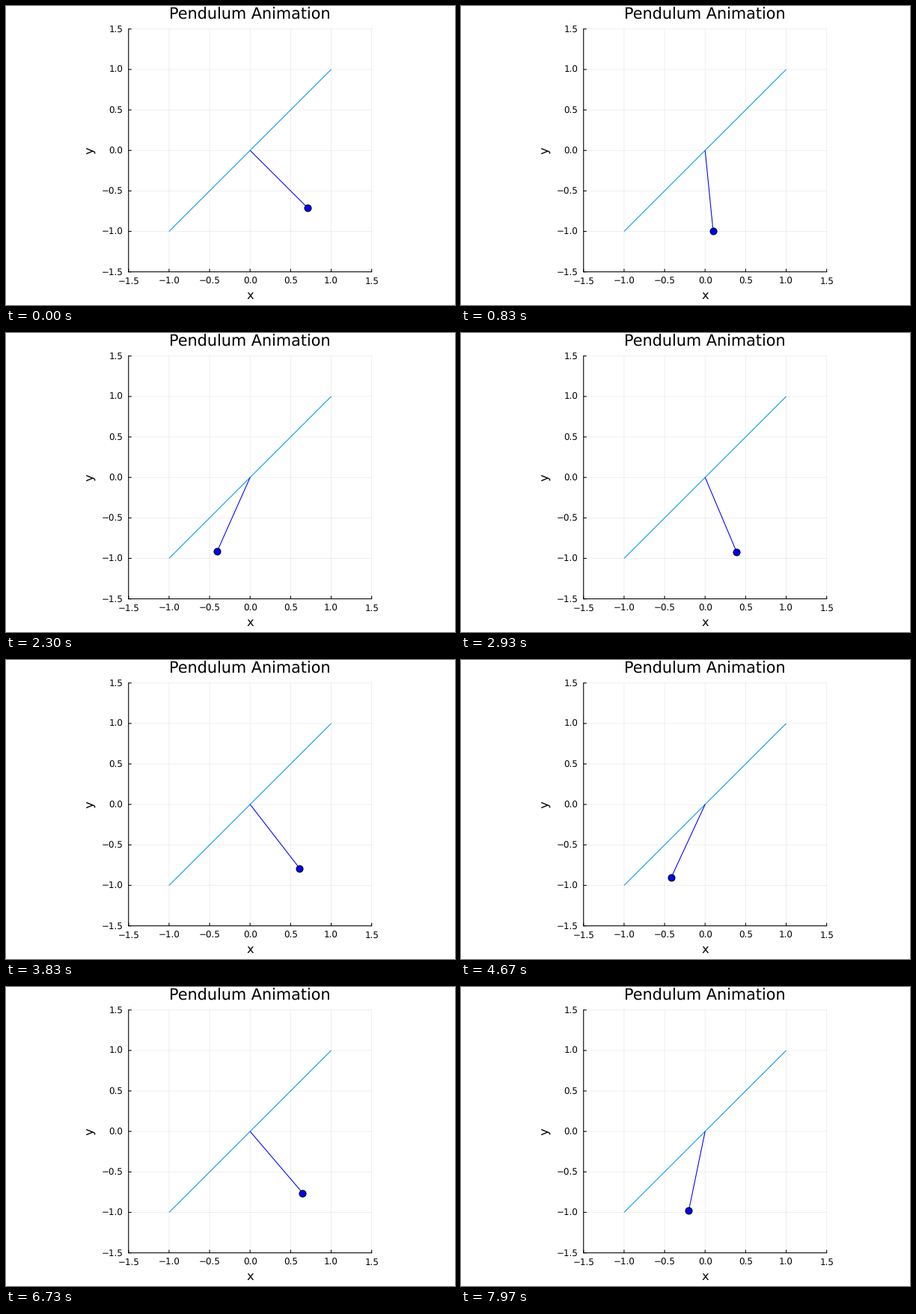
A matplotlib script for the animation above (8000 ms loop, 600x400 px).

```python
import numpy as np
import matplotlib.pyplot as plt
from matplotlib.animation import FuncAnimation

plt.rcParams.update({
    "font.family": "DejaVu Sans",
    "text.hinting": "none",
    "path.snap": False,
})

PX = 0.72                     # points per pixel at 100 dpi
CX, CY, UNIT = 326.2, 193.2, 108.3
LIMIT = 1.5
FRAMES = 240
GRAVITY, LENGTH, DT = 9.81, 1.0, 0.02


def to_px(x, y):
    return CX + UNIT * x, CY - UNIT * y


def swing(count, theta=np.pi / 4, omega=0.0, substeps=4):
    """Angles of an undamped pendulum, one per time step (RK4)."""
    def slope(s):
        return np.array([s[1], -GRAVITY / LENGTH * np.sin(s[0])])

    h = DT / substeps
    state = np.array([theta, omega])
    angles = []
    for _ in range(count):
        angles.append(state[0])
        for _ in range(substeps):
            a = slope(state)
            b = slope(state + h / 2 * a)
            c = slope(state + h / 2 * b)
            d = slope(state + h * c)
            state = state + h / 6 * (a + 2 * b + 2 * c + d)
    return angles


fig = plt.figure(figsize=(6, 4), dpi=100, facecolor="white")
ax = fig.add_axes([0, 0, 1, 1])
ax.set_xlim(0, 600)
ax.set_ylim(400, 0)
ax.axis("off")


def line(xs, ys, color, width=1.07, **style):
    return ax.plot(xs, ys, color=color, lw=width * PX, **style)[0]


def label(x, y, text, size, **style):
    ax.text(x, y, text, fontsize=size * PX, color="black", **style)


left, top = to_px(-LIMIT, LIMIT)
right, bottom = to_px(LIMIT, -LIMIT)
ticks = np.linspace(-LIMIT, LIMIT, 7)

for v in ticks:
    x, y = to_px(v, v)
    line([x, x], [top, bottom], "black", 0.8, alpha=0.08)
    line([left, right], [y, y], "black", 0.8, alpha=0.08)

line([left, right], [bottom, bottom], "black", solid_capstyle="projecting")
line([left, left], [top, bottom], "black", solid_capstyle="projecting")

for v in ticks:
    x, y = to_px(v, v)
    line([x, x], [bottom, bottom - 4], "black", solid_capstyle="butt")
    line([left, left + 4], [y, y], "black", solid_capstyle="butt")
    text = f"{v:.1f}".replace("-", "\u2212")
    label(x, 371.8, text, 11.9, ha="center", va="baseline")
    label(156.3, y + 4.3, text, 11.9, ha="right", va="baseline")

label(CX, 18.2, "Pendulum Animation", 20.8, ha="center", va="baseline")
label(CX, 391.6, "x", 16.3, ha="center", va="baseline")
label(112.3, CY, "y", 16.3, ha="center", va="center", rotation=90)

x0, y0 = to_px(-1, -1)
x1, y1 = to_px(1, 1)
line([x0, x1], [y0, y1], "#009afa", solid_capstyle="butt")

rod = line([], [], "blue", solid_capstyle="butt", zorder=3)
bob = line([], [], "blue", marker="o", ms=9 * PX, mec="black",
           mew=1.07 * PX, zorder=4)

angles = swing(FRAMES)


def draw(i):
    x, y = to_px(LENGTH * np.sin(angles[i]), -LENGTH * np.cos(angles[i]))
    rod.set_data([CX, x], [CY, y])
    bob.set_data([x], [y])
    return rod, bob


anim = FuncAnimation(fig, draw, frames=FRAMES, init_func=lambda: draw(0),
                     interval=8000 / FRAMES, repeat=True, repeat_delay=0)
plt.show()
```
